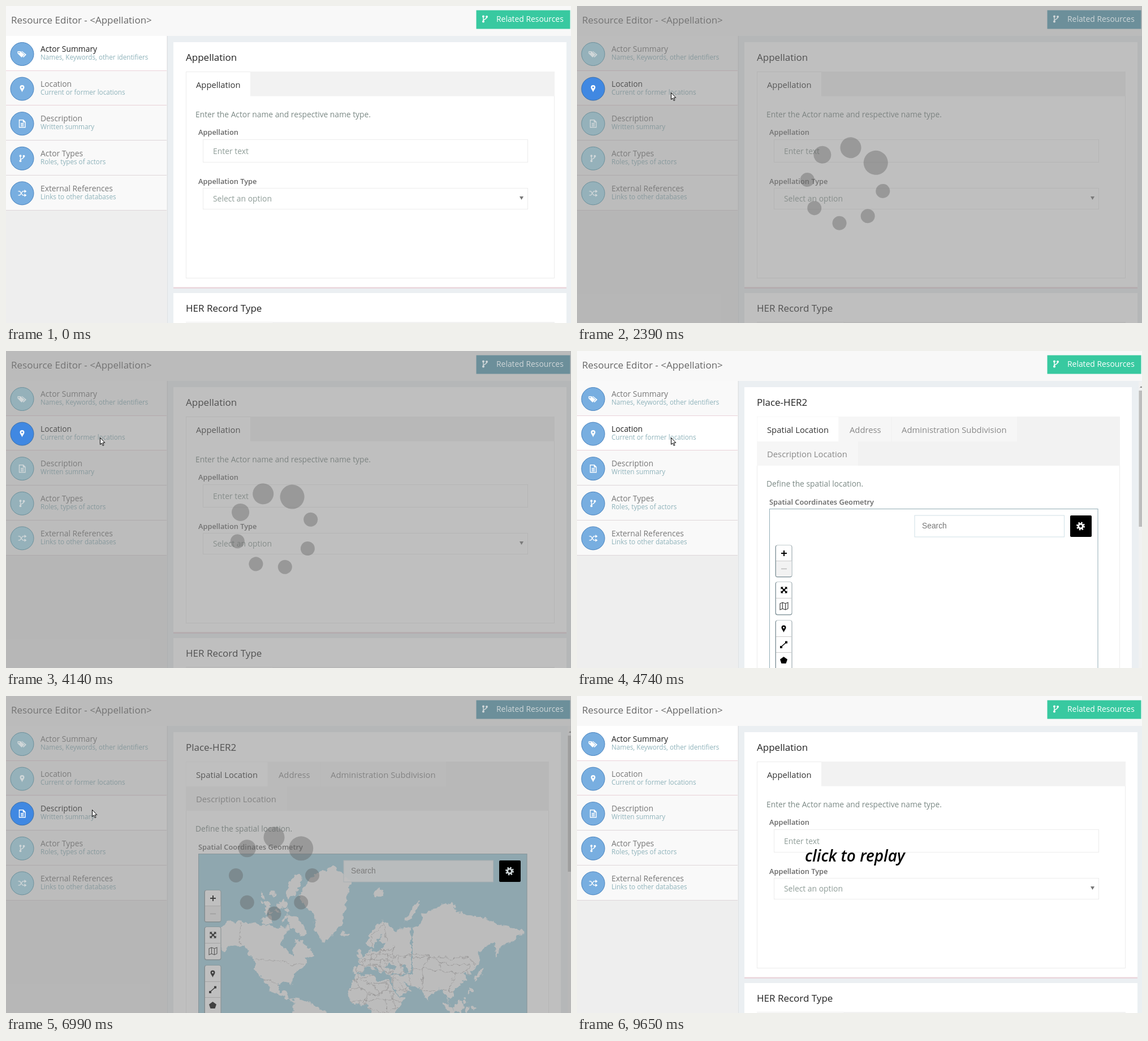
These frames come from a looping animation (999 by 561 pixels, 9.71 s). An HTML page:

```html
<!DOCTYPE html>
<html lang="en">
<head>
<meta charset="utf-8">
<title>Resource Editor</title>
<style>
  html, body { margin: 0; width: 100%; height: 100%; overflow: hidden; background: #ebeff2; }
  svg { display: block; font-family: "Open Sans", sans-serif; }
  .name { fill: #777; }
  .active .name { fill: #222; }
  .row rect { fill: #f9f9f9; }
  .row.active rect { fill: #fff; }
  .disc { fill: #78aee0; stroke: #4681bd; }
  .button { fill: #38c9a0; }
  .glyph { fill: #fff; }
  .line { fill: none; stroke: #fff; stroke-width: 1.4; }
  .masked .disc { fill: #95b1ba; stroke: #6b909b; }
  .masked .button { fill: #6c8f9a; }
  .masked .glyph { fill: #cfd6d8; }
  .masked .line { stroke: #cfd6d8; }
  .hover .disc { fill: #4088e2; stroke: #3a6ea8; }
  .hover .glyph { fill: #fff; }
  .hover .line { stroke: #fff; }
</style>
</head>
<body>
<svg id="stage" width="999" height="561" viewBox="0 0 999 561"></svg>
<script>
const text = (x, y, size, fill, str, extra = '') =>
  `<text x="${x}" y="${y}" font-size="${size}" fill="${fill}" ${extra}>${str}</text>`;
const rect = (x, y, x2, y2, fill, extra = '') =>
  `<rect x="${x}" y="${y}" width="${x2 - x}" height="${y2 - y}" fill="${fill}" ${extra}/>`;
const box = (x, y, x2, y2, stroke = '#ececec') =>
  rect(x + .5, y + .5, x2 - .5, y2 - .5, '#fff', `stroke="${stroke}"`);
const path = (d, extra = '') => `<path d="${d}" ${extra}/>`;
const at = (x, y, body) => `<g transform="translate(${x} ${y})">${body}</g>`;
const oval = (x, y, rx, ry, turn, fill) =>
  `<ellipse rx="${rx}" ry="${ry}" fill="${fill}" transform="translate(${x} ${y}) rotate(${turn})"/>`;

let seed = 7;
const random = (a, b) => {
  seed = seed * 16807 % 2147483647;
  return a + (b - a) * seed / 2147483647;
};

// Icons, centred on the origin
const line = d => path(d, 'class="line"');
const glyph = d => path(d, 'class="glyph" fill-rule="evenodd"');
const pin = 'M0 6C-1.5 2 -4 0 -4 -2.5a4 4 0 0 1 8 0C4 0 1.5 2 0 6zM-1.5 -2.5a1.5 1.5 0 1 0 3 0a1.5 1.5 0 1 0 -3 0z';
const fork = line('M-3 -3V3M3 -3C3 1 -3 0 -3 3') +
  glyph('M-5 -4.5a2 2 0 0 1 4 0a2 2 0 0 1 -4 0zM1 -4a2 2 0 0 1 4 0a2 2 0 0 1 -4 0zM-5 4.5a2 2 0 0 1 4 0a2 2 0 0 1 -4 0z');
const icons = [
  glyph('M-8 -5H-3L4 1L-1 6L-8 -1zM-6.6 -2.6a1.1 1.1 0 1 0 2.2 0a1.1 1.1 0 1 0 -2.2 0zM-1.5 -5H0L7.5 1L2.5 6L1 5L5 1z'),
  glyph(pin),
  line('M-5 -6.5H2L5.5 -3V6.5H-5zM2 -6.5V-3H5.5M-2.5 -.5H3M-2.5 1.7H3M-2.5 4H3'),
  fork,
  line('M-7 -3.5H-4L1 3.5H5M-7 3.5H-4L1 -3.5H5') + glyph('M4 -6.3L8 -3.5L4 -.7zM4 .7L8 3.5L4 6.3z')
];

// World map in Web Mercator: key points of each coast, roughened by noise
const project = (lon, lat) => [
  628 + lon * 1.516,
  552.5 - 86.9 * Math.log(Math.tan(Math.PI / 4 + lat * Math.PI / 360))
];
const trace = coast => 'M' + coast.match(/\S+ \S+/g).map(p => project(...p.split(' ').map(Number)).join(' ')).join('L');

const americas = '-168 66 -156 71 -128 70 -95 68 -82 69 -94 59 -80 52 -77 62 -65 60 -56 52 -66 50 -61 46 -74 41 -81 31 -80 25 -84 30 -97 28 -95 18 -88 21 -84 10 -72 12 -50 0 -35 -8 -80 -8 -78 7 -105 20 -113 31 -124 40 -124 48 -136 58 -150 60 -162 55';
const greenland = '-73 78 -60 82 -32 83.6 -12 81.5 -22 70 -43 60 -53 66 -55 73';
const africa = '-6 36 11 37 20 31 32 31 43 12 51 12 39 -8 12 -8 9 4 -8 5 -17 15 -10 30';
const europe = '60 68 44 68 41 66 26 71 15 68 5 60 10 59 15 56 17 61 25 65 21 61 30 60 21 55 11 55 11 57 8 54 -4 48 -1 44 -9 43 -9 37 -5 36 0 39 4 43 9 44 17 39 13 45 19 42 23 37 28 41 27 37 36 36 60 36';
const asia = '58 68 68 69 72 73 104 77 113 74 140 72 190 66 179 62 163 58 157 51 156 61 136 55 140 48 127 37 119 38 122 31 108 21 109 12 100 13 104 2 98 16 91 22 80 14 77 8 72 21 57 26 48 30 58 21 44 13 35 29 36 37 58 37';
const coast = [americas, greenland, africa, europe, asia].map(c => trace(c) + 'Z').join('');

const island = (lon, lat, rx, ry, turn, fill = '#fafafa') => oval(...project(lon, lat), rx, ry, turn, fill);
const islands =
  island(-78, 80.5, 10, 24, 30) +   // Ellesmere
  island(-75, 69, 24, 9, 48) +      // Baffin
  island(-110, 71, 9, 8, 0) +       // Victoria
  island(-2, 53.5, 4, 9, -15) +     // Britain
  island(-19, 65, 7, 3, 0) +        // Iceland
  island(20, 79, 8, 8, 0) +         // Svalbard
  island(60, 74, 4, 21, 35) +       // Novaya Zemlya
  island(137, 36.5, 3, 13, 40) +    // Japan
  island(114, 1, 8, 8, 0) +         // Borneo
  island(101, 0, 4, 13, -42);       // Sumatra
const seas = island(34, 43.5, 9, 4, 0, '#a0cfdf') + island(51, 42, 4, 9, -20, '#a0cfdf');

const scatter = (count, x, y, x2, y2, size) => Array.from({ length: count }, () =>
  oval(random(x, x2), random(y, y2), random(2, size), random(2, size), random(0, 90), '#fafafa')).join('');

// Borders: the edges of a lattice with shaken corners
function lattice(x, y, x2, y2, cell) {
  const columns = Math.ceil((x2 - x) / cell);
  let above = [], d = '';
  for (let row = 0; y + row * cell < y2; row++) {
    const corners = Array.from({ length: columns + 1 }, (_, i) =>
      [x + (i + random(-.4, .4)) * cell, y + (row + random(-.4, .4)) * cell]);
    d += 'M' + corners.join('L');
    above.forEach((p, i) => { if ((i + row) % 3) d += `M${p}L${corners[i]}`; });
    above = corners;
  }
  return d;
}
const borders = trace('-124 49 -95 49 -83 45 -67 46') + trace('-141 60 -141 70') + trace('-117 32 -106 31 -97 26') +
  trace('13 58 12 64 26 70 30 62') + trace('48 50 62 54 80 51 107 50 126 51 133 45') +
  lattice(623, 448, 676, 500, 10) + lattice(676, 468, 800, 525, 23) + lattice(602, 505, 692, 561, 17);

const world = rect(340, 279, 921.5, 561, '#a0cfdf') + `<g filter="url(#rough)">` +
  path(coast, 'fill="#fafafa"') + islands + scatter(16, 448, 345, 502, 396, 7) + scatter(12, 775, 515, 830, 561, 4) +
  path(borders, 'fill="none" stroke="#aaa6a6" stroke-width=".8" clip-path="url(#shore)"') + seas + '</g>';

const panel = right => rect(296, 64, right, 498, '#fff') + rect(296, 497.5, right, 500, '#ead6dc');

const form = (right, title, intro) => panel(right) +
  text(318, 97, 17, '#222', title) +
  box(318, 116, right - 21, 482) +
  rect(432, 116, right - 21, 159.5, '#f2f2f2') +
  text(336, 145, 14.8, '#333', title) +
  text(335, 197, 13.8, '#7b8985', intro) +
  text(340, 228, 12.8, '#666', title, 'font-weight="600"') +
  box(348, 236, right - 68, 277) +
  text(366, 262, 13.9, '#8f9d98', 'Enter text') +
  text(340, 315, 12.8, '#666', title + ' Type', 'font-weight="600"') +
  box(348, 322, right - 68, 360) +
  text(366, 346, 13.9, '#8f9d98', 'Select an option') +
  path(`M${right - 83} 337h7l-3.5 6z`, 'fill="#777"');

const scrollbar = end => rect(993, 54, 999, 561, '#f1f1f1') +
  rect(993.5, 70, 999, end, '#bdbdbd') + path('M995 65L997.5 62L999 64V65z', 'fill="#888"');

const tools = (top, bottom, splits) =>
  rect(350.5, top - .5, 380.5, bottom + 1.5, '#8a9ba1', 'rx="4"') +
  rect(352, top, 379.5, bottom, '#fff', 'rx="3"') +
  splits.map(y => rect(352, y, 379.5, y + 1, '#ccc')).join('');

const mapPage = rect(296, 64, 981, 561, '#fff') +
  text(318, 97, 17, '#222', 'Place-HER2') +
  box(318, 116, 960, 570) +
  rect(318, 116, 960, 203, '#f2f2f2') +
  rect(463, 116, 778, 160, '#f6f6f6') + rect(318, 160, 497, 203, '#f6f6f6') +
  rect(318.5, 116.5, 462.5, 160, '#fff') + rect(555.5, 117, 556.5, 160, '#f0f0f0') +
  text(336, 145, 14.8, '#333', 'Spatial Location') +
  text(482, 145, 14.8, '#888', 'Address') +
  text(574, 145, 14.85, '#888', 'Administration Subdivision') +
  text(336, 188, 14.8, '#888', 'Description Location') +
  text(335, 240, 13.8, '#7b8985', 'Define the spatial location.') +
  text(340, 272, 12.8, '#666', 'Spatial Coordinates Geometry', 'font-weight="600"') +
  `<g id="world" clip-path="url(#frame)">${world}</g>` +
  rect(340.5, 279.5, 921, 570, 'none', 'stroke="#93adb6"') +
  rect(597, 291, 861.5, 329, '#fff', 'fill-opacity=".88" stroke="#cfe0e6"') +
  text(610, 314, 13.8, '#777', 'Search', 'font-family="Liberation Sans, Arial, sans-serif"') +
  tools(344, 399, [371]) + rect(352, 372, 379.5, 398.5, '#f2f2f2') +
  path('M361 358H371M366 353V363', 'stroke="#000" stroke-width="2"') +
  path('M361 385.5H371', 'stroke="#bbb" stroke-width="1.5"') +
  tools(409, 466, [437]) +
  path('M362 419L370 427M370 419L362 427', 'stroke="#000" stroke-width="2"') +
  path('M360.5 417.5h4.5l-4.5 4.5zM371.5 417.5h-4.5l4.5 4.5zM360.5 428.5h4.5l-4.5 -4.5zM371.5 428.5h-4.5l4.5 -4.5z') +
  path('M359 447l4.5 -2l5 2l4.5 -2v11l-4.5 2l-5 -2l-4.5 2zM363.5 445v11M368.5 447v11', 'fill="none" stroke="#333" stroke-width="1.1"') +
  tools(477, 570, [505, 533]) +
  at(365.5, 492, path(pin, 'fill-rule="evenodd"')) +
  path('M361 523.5L370 515.5', 'stroke="#000" stroke-width="1.5"') +
  path('M359 522h4v4h-4zM368 513.5h4v4h-4zM365.5 541l6.5 4.8l-2.5 7.2h-8l-2.5 -7.2z') +
  scrollbar(311);

const gear = rect(872, 291, 910, 329, '#000', 'rx="2"') + at(890.5, 310,
  `<g fill="none" class="line" style="stroke-width:3"><circle r="3.9"/><circle r="6" stroke-dasharray="2.356"/></g>`);

const pages = [
  form(991, 'Appellation', 'Enter the Actor name and respective name type.') +
    rect(296, 508, 991, 561, '#fff') + text(318, 541, 17, '#222', 'HER Record Type') +
    rect(318, 559, 970, 560, '#ececec') + rect(471, 559, 970, 561, '#f2f2f2'),
  mapPage,
  form(981, 'Description', 'Enter a description and description type for the resource.') + scrollbar(557)
];

const ROW = 61.7;
const sections = [
  ['Actor Summary', 'Names, Keywords, other identifiers'],
  ['Location', 'Current or former locations'],
  ['Description', 'Written summary'],
  ['Actor Types', 'Roles, types of actors'],
  ['External References', 'Links to other databases']
];
const rows = sections.map(([name, note], i) => {
  const y = 53 + ROW * i;
  return `<g class="row">${rect(0, y, 284, y + ROW, '')}
    <text class="name" x="61" y="${y + 28}" font-size="13.85">${name}</text>
    ${text(61, y + 42, 11.7, '#8fb3bb', note)}</g>`;
}).join('');
const rules = sections.map((_, i) => {
  const y = Math.floor(52.5 + ROW * (i + 1));
  return rect(0, y, 284, y + 1, i < 2 ? '#ead3d9' : '#ded6d9');
}).join('');
const discs = icons.map((icon, i) =>
  `<g class="spot">${at(28.5, 85 + 61.6 * i, '<circle class="disc" r="20.5"/>' + icon)}</g>`).join('');

const dots = Array.from({ length: 8 }, (_, i) => {
  const a = -Math.PI / 4 * (i + 1);
  return `<circle cx="${67.5 * Math.cos(a)}" cy="${67.5 * Math.sin(a)}" r="${Math.max(12.5, 21.5 - 3 * i)}"/>`;
}).join('');

const stage = document.getElementById('stage');
stage.innerHTML = `<defs>
    <clipPath id="frame">${rect(340, 279, 921.5, 561, '')}</clipPath>
    <clipPath id="shore">${path(coast)}</clipPath>
    <filter id="rough" filterUnits="userSpaceOnUse" x="330" y="270" width="600" height="300" color-interpolation-filters="sRGB">
      <feTurbulence type="fractalNoise" baseFrequency=".11" numOctaves="3" seed="4"/>
      <feDisplacementMap in="SourceGraphic" scale="11" xChannelSelector="R" yChannelSelector="G"/>
    </filter>
  </defs>` +
  rect(0, 0, 999, 561, '#ebeff2') + rect(0, 53, 285, 561, '#eee') + rect(285, 53, 286, 561, '#dde1e4') +
  rows + rules + pages.map(p => `<g class="page">${p}</g>`).join('') +
  rect(0, 0, 999, 53, '#f8f8f8') + text(9, 31, 17, '#666', 'Resource Editor - &lt;Appellation&gt;') +
  rect(0, 0, 999, 561, '#808080', 'id="mask" fill-opacity=".5"') +
  discs + rect(831.5, 7.5, 997.5, 40.5, '', 'class="button"') + at(847, 23, fork) +
  '<text class="glyph" x="867" y="28" font-size="13.9">Related Resources</text>' +
  `<g id="gear">${gear}</g><g id="spinner" fill="#606060" fill-opacity=".4">${dots}</g>` +
  `<g id="cursor" fill="#fff" stroke="#000" stroke-linejoin="round">
    ${path('M.5 .5V12.5L3.2 10L5.2 14.5L7 13.7L5.1 9.3H8.8z', 'id="arrow"')}
    ${path('M0 .5C1 .5 1.5 1.2 1.5 2.2V7.5L6 8.5C7.3 8.8 8 9.5 8 11C8 14 6.5 15 6.2 19H-1.5C-1.7 16.5 -4.5 14.5 -5.5 11.5C-4.5 10 -3 10.7 -1.5 12.5V2.2C-1.5 1.2 -1 .5 0 .5zM1.5 7.5V11M4 8.2V11', 'id="hand"')}
  </g>` +
  text(403, 293, 28, '#000', 'click to replay', 'id="replay" font-weight="600" font-style="italic"');

const $ = id => document.getElementById(id);
const show = (el, on) => el.style.display = on ? '' : 'none';
const each = (cls, fn) => stage.querySelectorAll(cls).forEach(fn);

const LOOP = 9710, LOADS = [[2390, 4740], [6990, 8030]], REPLAY = 9650, TICK = 72.9;
const moves = [
  { from: 300, to: 1180, steps: 13, a: [904, 536], b: [203, 78] },
  { from: 1570, to: 1850, steps: 5, a: [203, 78], b: [166, 153] },
  { from: 5890, to: 6530, steps: 10, a: [166, 153], b: [152, 201] }
];

function pointer(t) {
  const m = moves.filter(m => t >= m.from).pop();
  if (!m) return [0, 0];
  const step = Math.floor((t - m.from) / (m.to - m.from) * (m.steps - 1)) + 1;
  const p = Math.min(1, step / m.steps), e = (1 - Math.cos(Math.PI * p)) / 2;
  return m.a.map((v, i) => v + (m.b[i] - v) * e);
}

function draw(now) {
  const t = now % LOOP;
  const load = LOADS.find(([a, b]) => t >= a && t < b);
  const page = t >= REPLAY ? 0 : LOADS.filter(l => t >= l[1]).length;
  const active = load ? page + 1 : page;
  const [x, y] = pointer(t);
  const over = t >= 300 && x < 285 ? Math.floor((y - 53) / ROW) : -1;

  stage.classList.toggle('masked', !!load);
  each('.page', (el, i) => show(el, i === page));
  each('.row', (el, i) => el.classList.toggle('active', i === active));
  each('.spot', (el, i) => el.classList.toggle('hover', i === over && i > page && t < REPLAY));
  show($('gear'), page === 1);
  $('world').style.opacity = t < 4880 ? 0 : t < 4960 ? .5 : 1;

  show($('mask'), load);
  show($('spinner'), load);
  if (load) {
    const spin = Math.floor((t - load[0]) / TICK) * TICK * .1914 + (page ? 0 : 8.5);
    $('spinner').setAttribute('transform', `translate(474 317.5) rotate(${spin})`);
  }

  const hand = over >= 0 && !load && !(t >= 4740 && t < 5650);
  show($('cursor'), t >= 300 && t < REPLAY);
  show($('hand'), hand);
  show($('arrow'), !hand);
  $('cursor').setAttribute('transform', `translate(${x} ${y})`);
  show($('replay'), t >= REPLAY);
}

const start = performance.now();
(function frame() {
  draw(performance.now() - start);
  requestAnimationFrame(frame);
})();
</script>
</body>
</html>
```
